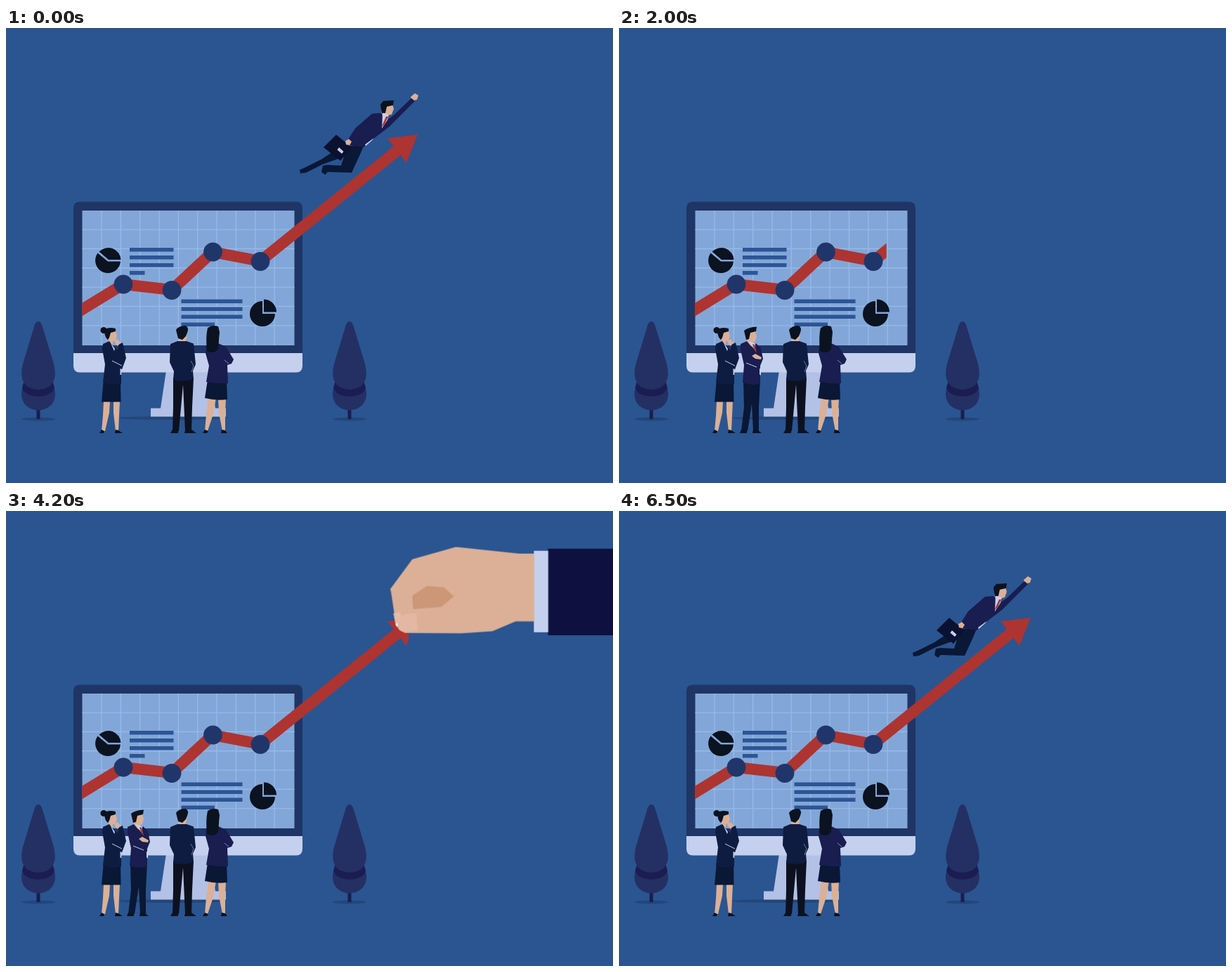
An HTML page without scripts for the animation above (8.6 s loop, 864 by 648 pixels).

```html
<!DOCTYPE html>
<html lang="en">
<head>
<meta charset="utf-8">
<title>Growth chart</title>
<style>
  html, body { margin: 0; width: 100%; height: 100%; overflow: hidden; background: #2a5591; }
  svg { display: block; width: 864px; height: 648px; }

  .skin { fill: #dbb096; }
  .pale { fill: #c5d0ee; }
  .ink { fill: #0b1220; }
  .navy { fill: #0e1c41; }
  .plum { fill: #191d4f; }
  .dark { fill: #0a1735; }
  .red { fill: #ad3431; }
  .bar { fill: #2b5595; }
  .crease { fill: none; stroke: #c5d0ee; stroke-width: 1; }
  .grid { fill: none; stroke: #97bae9; stroke-dasharray: 1.3 26.05; }

  .wipe, .hand, .flier, .standing { animation: 8.6s linear infinite; }
  .wipe { animation-name: wipe; }
  .hand { animation-name: hand; }
  .flier { animation-name: fly, airborne; animation-timing-function: linear, step-end; }
  .standing { animation-name: grounded; animation-timing-function: step-end; }

  /* The chart line is revealed left to right, then pulled out by the hand. */
  @keyframes wipe {
    0% { width: 482px; animation-timing-function: step-end; }
    1.16% { width: 0; animation-timing-function: step-end; }
    2.32% { width: 0; animation-timing-function: steps(20); }
    25.58% { width: 303px; animation-timing-function: steps(5); }
    31.39% { width: 337px; animation-timing-function: steps(17); }
    51.16%, 100% { width: 482px; }
  }
  @keyframes hand {
    0% { transform: translate(400px, 52px); animation-timing-function: step-end; }
    25.58% { transform: translate(380px, 52px); animation-timing-function: steps(5); }
    31.39% { transform: translate(-66px, 52px); animation-timing-function: steps(8); }
    40.69% { transform: translate(0, 0); animation-timing-function: steps(9); }
    51.16% { transform: translate(75px, -57px); animation-timing-function: steps(13); }
    66.27% { transform: translate(265px, -57px); animation-timing-function: steps(8); }
    75.58%, 100% { transform: translate(382px, -57px); }
  }
  @keyframes fly {
    0% { transform: none; animation-timing-function: step-end; }
    1.16% { transform: translate(-120px, 100px); animation-timing-function: step-end; }
    51.16% { transform: translate(-120px, 100px); animation-timing-function: steps(4); }
    55.81% { transform: translate(-97px, 81px); animation-timing-function: steps(9); }
    66.27% { transform: translate(-46px, 39px); animation-timing-function: steps(8); }
    75.58%, 100% { transform: translate(0, 0); }
  }
  @keyframes airborne {
    0%, 51.16%, 100% { visibility: visible; }
    1.16% { visibility: hidden; }
  }
  @keyframes grounded {
    0%, 51.16%, 100% { visibility: hidden; }
    1.16% { visibility: visible; }
  }
</style>
</head>
<body>
<svg viewBox="0 0 864 648">
  <defs>
    <clipPath id="reveal"><rect class="wipe" x="108" y="100" width="482" height="350"/></clipPath>
    <g id="tree">
      <ellipse cx="46" cy="557" rx="24" ry="2.5" fill="#234679"/>
      <path d="M43.500 540h5v17h-5z" fill="#1b1d4f"/>
      <path d="M22 521C22 492 70 492 70 521C70 552 22 552 22 521z" fill="#243063"/>
      <path d="M23 512C26 529 66 529 69 512L66 502H26z" fill="#1b1d52"/>
      <path d="M46 418C50 418 51 422 53 429L67 475C70 485 71 495 68 502C62 519 30 519 24 502C21 495 22 485 25 475L39 429C41 422 42 418 46 418z" fill="#243063"/>
    </g>
  </defs>

  <rect width="864" height="648" fill="#2a5591"/>
  <use href="#tree"/>
  <use href="#tree" x="443"/>

  <g id="monitor">
    <ellipse cx="236" cy="555.500" rx="77" ry="2.500" fill="#234679"/>
    <path d="M228 488H290L298 541.500H313V553.500H206V541.500H220z" fill="#b3c1e6"/>
    <path d="M105 247.500H413Q422 247.500 422 256.500V464H96V256.500Q96 247.500 105 247.500z" fill="#1f3566"/>
    <path class="pale" d="M96 463H422V481Q422 490.500 413 490.500H105Q96 490.500 96 481z"/>
    <rect x="108.500" y="260" width="302" height="192" fill="#82a6d8"/>
    <path class="grid" d="M135.400 356H400" stroke-width="192"/>
    <path class="grid" d="M259.500 286.400V445" stroke-width="302"/>
  </g>

  <g id="figures" class="ink">
    <path d="M145 332.500L130.500 320.500A18 18 0 1 0 163 332.500z"/>
    <path d="M146 330L132.500 318.500A18 18 0 0 1 163.500 330z"/>
    <path d="M365 407V389A18 18 0 1 0 383 407zM367 404.500V386.500A18 18 0 0 1 385 404.500z"/>
    <path class="bar" d="M176 313h62.500v5.500h-62.500zm0 11h62.500v5.500h-62.500zm0 11h62.500v5.500h-62.500zm0 11h21.500v5.500h-21.500z"/>
    <path class="bar" d="M249.500 386.500h87v5.500h-87zm0 11h87v5.500h-87zm0 11h87v5.500h-87zm0 11h47.500v5.500h-47.500z"/>
  </g>

  <g clip-path="url(#reveal)">
    <path d="M100 406L167 365L236 373L294 319L362 332L560 172" fill="none" stroke="#ad3431" stroke-width="16"/>
    <path class="red" d="M586 152L543 157L570 192z"/>
    <g fill="#20366a">
      <circle cx="167" cy="365" r="13.400"/>
      <circle cx="236" cy="373.500" r="13.400"/>
      <circle cx="294.500" cy="319" r="13.400"/>
      <circle cx="362" cy="332.500" r="13.400"/>
    </g>
  </g>

  <g id="thinker">
    <path class="skin" d="M139 531H148L147 548L141 574H136L138 552zM153 531H162L161 552L160 574H156L153 548z"/>
    <path class="ink" d="M136 572L140 574L139 577H133zM156 572L160 573L166 577H155z"/>
    <path class="dark" d="M139 500H163L163.500 532.500H136z"/>
    <path class="skin" d="M146 432H156L158 438L156 445L152 446V455L146 450z"/>
    <circle class="ink" cx="139" cy="430.500" r="4.500"/>
    <path class="ink" d="M140 430Q145 425.500 156 428V432L149 434L147 441L145 444Q140 440 140 430z"/>
    <path class="navy" d="M147 446L138 450L137 457L141 479L138 505Q151 510 164 506.500V489L171 470L166 448L160 451L159 459L153 453z"/>
    <path class="pale" d="M148 446.500L155 457L154 460zM162.500 485L165 486L164 494H162.500z"/>
    <path class="skin" d="M154 446L159 443L163 448L159 453L156 450z"/>
    <path class="crease" d="M151 474L165 481"/>
  </g>

  <g class="standing">
    <path class="dark" d="M177 500H201L199 540L199 574H191L189 535L183 574H174L178 540z"/>
    <path class="ink" d="M174 572L182 574V577H172zM191 572L198 573L203 577H190z"/>
    <path class="skin" d="M182 432H194L196 439L194 446L191 447L192 455L182 450z"/>
    <path class="ink" d="M178 431Q184 426 196 425.500L195 432L187 434L185 443L181 444z"/>
    <path class="plum" d="M182 446L173 450L173 458L178 480L176 505Q188 510 201 506.500V481L205 471L202 456L195 449L191 457z"/>
    <path class="pale" d="M184 446L193 449L195 461zM200 485H202V495L200 493z"/>
    <path class="red" d="M190 450L193 451L196 463L192 457z"/>
    <path class="crease" d="M181 477L196 483"/>
    <path class="skin" d="M189 467L194 464L203 469L202 472L194 471z"/>
  </g>

  <g id="watcher">
    <path d="M238 498H267L265 540L264 574H255L252 508L246 574H237L238 540z" fill="#0d111f"/>
    <path class="ink" d="M237 572L245 574V577H234zM255 573L264 572L271 577H254z"/>
    <path class="skin" d="M247 433H258L257 442L255 448H246z"/>
    <path class="ink" d="M242 430Q245 424.500 255 424Q261 426 258 434L256 439L251 444L245 442z"/>
    <path class="navy" d="M244 446H257L267 449.500L270 479L266 488L267 500Q253 505 238 501L239 489L233 476L234 450z"/>
    <path class="crease" d="M263 474L267 481L264 490" opacity=".5"/>
  </g>

  <g id="onlooker">
    <path class="skin" d="M288 527H299L295 550L287 574H283L285 550zM302 527H313L312 550L312 574H308L303 548z"/>
    <path class="ink" d="M283 572L288 574L286 577H280zM307 572L312 573L315 577H306z"/>
    <path class="dark" d="M287 501H314L315 529Q299 531 283 527z"/>
    <path class="skin" d="M297 430H303L304 440L302 449H294z"/>
    <path class="plum" d="M285 452L302 449L313 454L324 472L321 478L315 480L316 506Q301 507 285 504L289 481L284 463z"/>
    <path class="crease" d="M311 473L317 478" opacity=".6"/>
    <path class="ink" d="M287 427Q294 422 302 425L304 433L302 457Q296 465 286 460Q284 440 287 427z"/>
  </g>

  <g class="flier">
    <path class="dark" d="M470 173L482 183L451 194L427 206L419 207L418 202L425 199L449 187z"/>
    <path class="dark" d="M486 168L509 168L504 180L492 206L458 205L454 209L449 205L451 196L458 195L477 196z"/>
    <path d="M470 152L492 170L476 189L452 170z" fill="#0b1130"/>
    <path class="skin" d="M535 116L540 109H550L552 115L549 123L545 124L541 133L533 128zM576 98L582 93L587 96L585 102L578 104z"/>
    <path class="ink" d="M533 109L537 104L552 103L551 110L542 112L540 121L535 122z"/>
    <path class="plum" d="M521 122L534 121L541 132L552 124L577 100L582 104L554 132L545 141L520 160L509 170L489 167L486 160L497 143z"/>
    <path class="pale" d="M536 121L544 123L543 131L535 143zM511 166L523 157L521 160L512 168z"/>
    <path class="red" d="M541 126L544 126L539 137L534 142z"/>
    <path class="pale" d="M474 170L480.500 176L478 179L471.500 173.500z"/>
    <path class="skin" d="M483 161L488 158L492 162L489 167L484 166z"/>
  </g>

  <g class="hand">
    <rect x="713" y="98" width="320" height="123" fill="#0e1140"/>
    <rect class="pale" x="693" y="101" width="20.500" height="116"/>
    <path class="skin" d="M489 155L520 113L582 95.500L672 105H693.500V201.500H667L634 215.500L590 218.500L509 218L497 208z"/>
    <path d="M520 165L541 151L565 153L579 166L561 181L521 184z" fill="#cb9777"/>
    <path d="M493 190L503 188L504 194L499 207L496 205z" fill="#e3bba9"/>
    <path d="M496 205L500 204L498 210z" fill="#fff"/>
    <path d="M504 194Q512 189 526 190L528 214Q512 217 505 216Q498 213 499 205z" fill="#e2b8a4"/>
  </g>
</svg>
</body>
</html>
```
